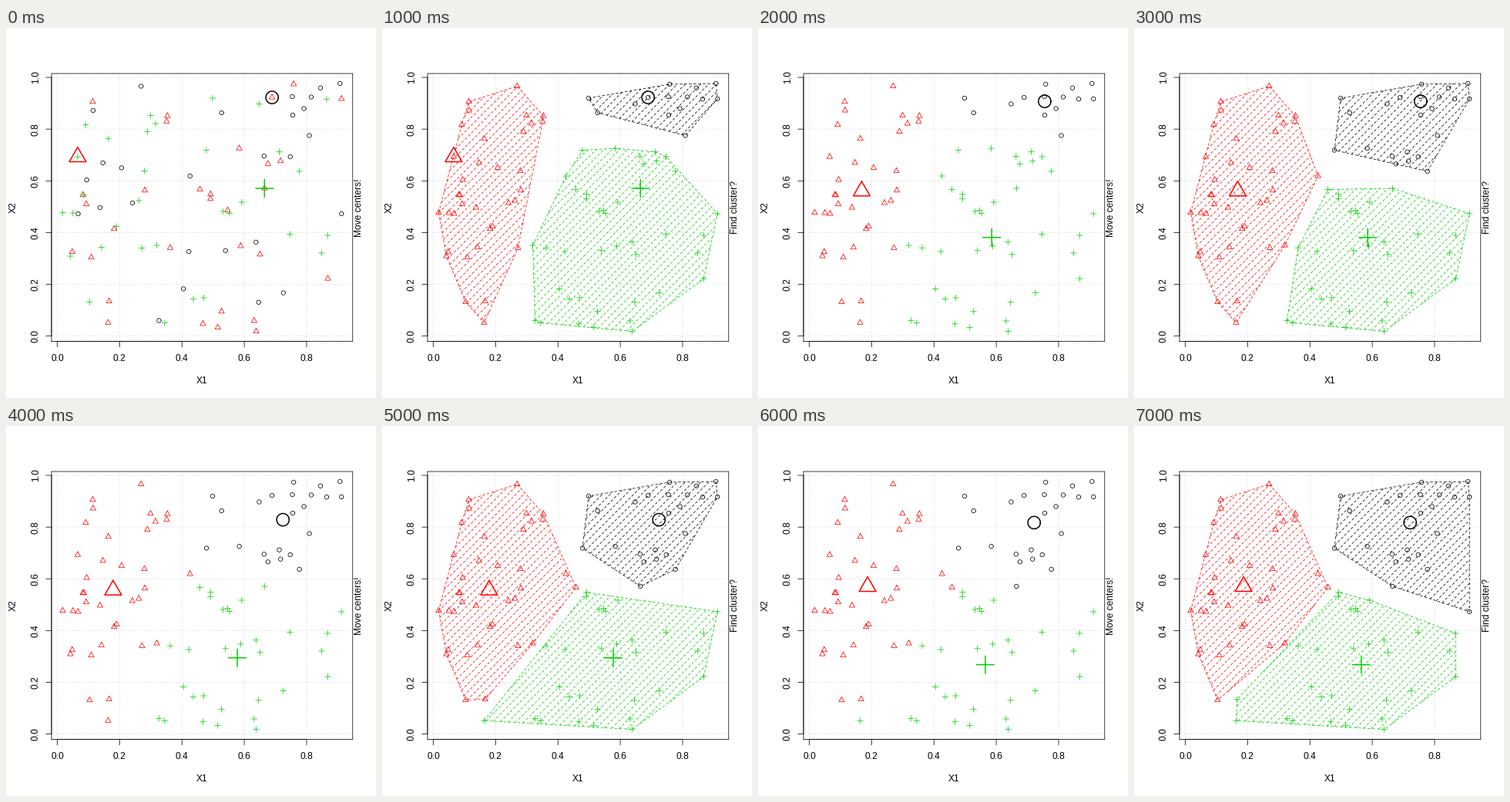
A matplotlib script that plays this animation: 480 by 480 pixels, repeating every 8 s.

```python
import numpy as np
import matplotlib.pyplot as plt
from matplotlib.animation import FuncAnimation
from matplotlib.collections import LineCollection

plt.rcParams["font.family"] = "Liberation Sans"

SIZE = 480
LEFT, RIGHT, TOP, BOTTOM = 59.04, 449.76, 59.04, 406.56
LINE = 14.4                      # height of one margin text line
X0, Y0 = 66.55, 399.55           # pixel position of the data origin
UNIT = np.array([404.3, 335.5])  # pixels per data unit
COLORS = ["#000000", "#ff0000", "#00cd00"]
THIN = 0.75
HATCH_STEP = 7.2 * np.sqrt(2)

# Points in pixels, grouped by their random starting label.
circles = [
    (175.3, 75.5), (113, 107), (279.7, 110), (371.5, 89), (396, 89.5),
    (408, 77.7), (433.2, 72), (386.5, 104.5), (372, 113), (393.5, 139.5),
    (334.8, 166.3), (368.7, 167), (125.7, 174.9), (104.6, 197), (150, 181.4),
    (164, 227), (122, 233), (93.5, 241), (238.7, 192), (435.2, 240.9),
    (324.3, 277.8), (284.7, 288.8), (237.2, 290), (230.2, 338.4),
    (198.5, 379.5), (327.7, 355.8), (359.8, 343.6),
]
triangles = [
    (112.5, 95.7), (209.4, 114.1), (208.4, 121.3), (373.2, 72.9), (345.2, 90.1),
    (435.2, 91.9), (302.6, 156.1), (339.8, 176.3), (356.2, 172.7), (335.3, 208),
    (99.7, 216.7), (104, 228.6), (180.1, 210.7), (251.6, 209.4), (265.4, 215.7),
    (265.2, 221.7), (287.6, 236.7), (140.2, 260.6), (85.9, 290.6),
    (110.6, 297.5), (213, 285.2), (304.5, 282.9), (329.5, 293.8),
    (417.5, 325.1), (133.8, 354.5), (132.5, 382.3), (255.5, 383.8),
    (279.6, 367.7), (274.7, 388.4), (321.9, 380), (324.6, 393.6),
]
pluses = [
    (103.4, 125.6), (132.8, 143.7), (187.5, 113.6), (194, 124), (183.4, 134.5),
    (268, 91), (328.4, 98.5), (416, 92.2), (260, 158.5), (354.5, 160.7),
    (380.6, 185.9), (93, 167.2), (179.6, 185.5), (172.3, 224), (101, 216.7),
    (73.5, 239.5), (86.8, 240), (143.4, 257.5), (83.5, 296), (123.9, 284.6),
    (176.4, 285.5), (195.6, 282), (305.9, 226), (281.4, 238), (290, 240.5),
    (368.3, 267.4), (417.2, 269), (409.3, 291.9), (108.5, 355.5),
    (243, 351.5), (256.6, 350), (205.8, 382.6),
]
points = np.array(circles + triangles + pluses)
start_labels = np.repeat([0, 1, 2], [len(circles), len(triangles), len(pluses)])
start_centers = np.array([(345.2, 90.1), (93, 167.2), (335.3, 208)])

# Marker outlines at size 1, one list of strokes per cluster.
R = 2.7
turn = np.linspace(0, 2 * np.pi, 49)
ARM = R * np.sqrt(2)
SHAPES = [
    [R * np.column_stack([np.cos(turn), np.sin(turn)])],
    [R * np.array([(0, -1.5551), (1.3468, 0.7776), (-1.3468, 0.7776), (0, -1.5551)])],
    [np.array([(-ARM, 0), (ARM, 0)]), np.array([(0, -ARM), (0, ARM)])],
]


def k_means_steps(rounds=4):
    """Alternate between moved centers and reassigned points."""
    steps, labels, centers = [], start_labels, start_centers
    for _ in range(rounds):
        steps.append((False, labels, centers))
        gaps = (points[:, None] - centers[None]) / UNIT
        labels = (gaps ** 2).sum(axis=2).argmin(axis=1)
        steps.append((True, labels, centers))
        centers = np.array([points[labels == k].mean(axis=0) for k in range(3)])
    return steps


def half_hull(pts):
    chain = []
    for p in pts:
        while len(chain) > 1:
            a, b = chain[-2], chain[-1]
            if (b[0] - a[0]) * (p[1] - a[1]) > (b[1] - a[1]) * (p[0] - a[0]):
                break
            chain.pop()
        chain.append(p)
    return chain[:-1]


def convex_hull(pts):
    order = sorted(map(tuple, pts))
    hull = half_hull(order) + half_hull(order[::-1])
    return np.array(hull + hull[:1])


def hatch_lines(hull):
    """Clip the 45 degree lines x + y = c to a closed convex outline."""
    sums = hull.sum(axis=1)
    origin = X0 + Y0
    first = int(np.ceil((sums.min() - origin) / HATCH_STEP))
    last = int(np.floor((sums.max() - origin) / HATCH_STEP))
    lines = []
    for c in origin + HATCH_STEP * np.arange(first, last + 1):
        cuts = []
        for a, b, sa, sb in zip(hull, hull[1:], sums, sums[1:]):
            if (sa < c) != (sb < c):
                cuts.append(tuple(a + (b - a) * (c - sa) / (sb - sa)))
        if len(cuts) == 2:
            lines.append(sorted(cuts))
    return lines


fig = plt.figure(figsize=(SIZE / 72, SIZE / 72), dpi=72, facecolor="white")
ax = fig.add_axes([0, 0, 1, 1])


def stroke(lines, color, width=THIN, style="solid"):
    lc = LineCollection(lines, colors=color, linewidths=width, linestyles=style,
                        capstyle="round", joinstyle="round")
    lc.set_snap(False)
    lc.set_zorder(len(ax.collections) + 1)
    ax.add_collection(lc, autolim=False)


def label(x, y, text, rotation=0):
    ax.text(x, y, text, fontsize=12, color="black", rotation=rotation,
            ha="center", va="baseline", rotation_mode="anchor", zorder=50)


def markers(spots, kind, scale=1, width=THIN):
    stroke([s * scale + p for p in spots for s in SHAPES[kind]], COLORS[kind], width)


def draw_grid(xs, ys):
    lines = [[(x, BOTTOM), (x, TOP)] for x in xs]
    lines += [[(LEFT, y), (RIGHT, y)] for y in ys]
    stroke(lines, "#d3d3d3", style=(0, (1, 3)))


def draw_axes(xs, ys):
    tick = LINE / 2
    lines = [[(x, BOTTOM), (x, BOTTOM + tick)] for x in xs]
    lines += [[(LEFT, y), (LEFT - tick, y)] for y in ys]
    lines += [[(xs[0], BOTTOM), (xs[-1], BOTTOM)], [(LEFT, ys[0]), (LEFT, ys[-1])]]
    lines.append([(LEFT, BOTTOM), (RIGHT, BOTTOM), (RIGHT, TOP), (LEFT, TOP), (LEFT, BOTTOM)])
    stroke(lines, "black")
    for i, x in enumerate(xs):
        label(x, BOTTOM + 1.8 * LINE, f"{i / 5:.1f}")
    for i, y in enumerate(ys):
        label(LEFT - 1.2 * LINE, y, f"{i / 5:.1f}", 90)
    label((LEFT + RIGHT) / 2, BOTTOM + 3.8 * LINE, "X1")
    label(LEFT - 3.2 * LINE, (TOP + BOTTOM) / 2, "X2", 90)


STEPS = k_means_steps()


def draw(i):
    ax.clear()
    ax.set_xlim(0, SIZE)
    ax.set_ylim(SIZE, 0)
    ax.axis("off")
    finding, labels, centers = STEPS[i]
    xs = X0 + UNIT[0] * 0.2 * np.arange(5)
    ys = Y0 - UNIT[1] * 0.2 * np.arange(6)
    draw_grid(xs, ys)
    draw_axes(xs, ys)
    for k in range(3):
        group = points[labels == k]
        if finding:
            hull = convex_hull(group)
            stroke(hatch_lines(hull), COLORS[k], style=(0, (4, 4)))
            stroke([hull], COLORS[k], style=(0, (4, 4)))
        markers(group, k)
    for k in range(3):
        markers(centers[k:k + 1], k, scale=3, width=2 * THIN)
    hint = "Find cluster?" if finding else "Move centers!"
    label(RIGHT + 0.8 * LINE, (TOP + BOTTOM) / 2, hint, 90)
    return []


anim = FuncAnimation(fig, draw, frames=len(STEPS), interval=1000,
                     init_func=lambda: [], repeat=True, repeat_delay=0)
plt.show()
```
